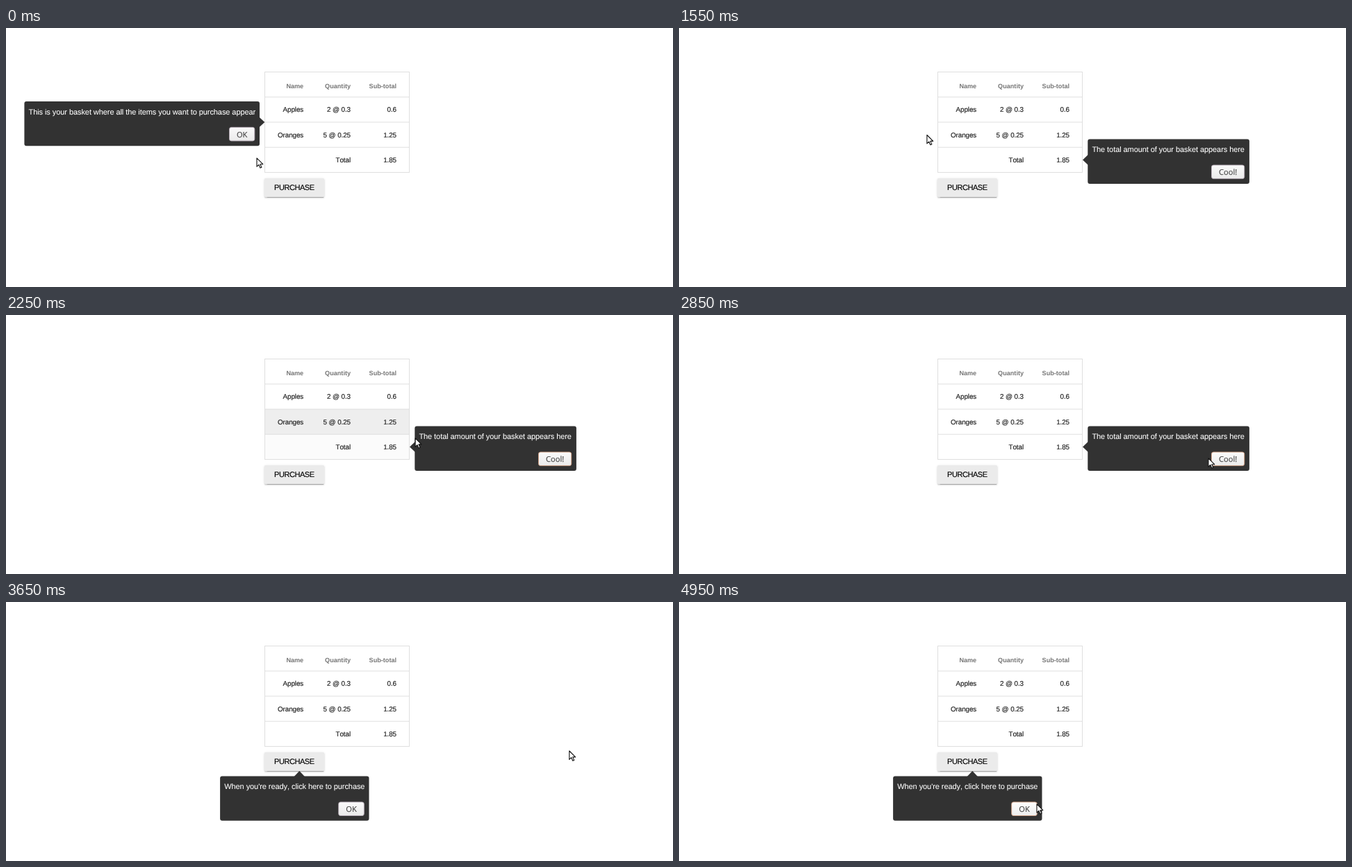
An HTML page that plays this animation: 960 by 374 pixels, repeating every 5 s.

```html
<!DOCTYPE html>
<html lang="en">
<head>
<meta charset="utf-8">
<title>Basket tour</title>
<style>
html, body { margin: 0; width: 100%; height: 100%; overflow: hidden; background: #fff; }
svg { position: absolute; left: 0; top: 0; display: block; }
text { font-family: "Liberation Sans", Arial, sans-serif; font-kerning: none; text-rendering: geometricPrecision; stroke-width: .15px; }
.head { font-size: 9.1px; font-weight: bold; fill: #757575; text-anchor: end; }
.cell { font-size: 9.9px; letter-spacing: -.1px; fill: #1c1c1c; stroke: #1c1c1c; text-anchor: end; }
.tip { font-size: 11px; letter-spacing: -.07px; fill: #fff; stroke: #fff; stroke-width: .08px; }
.label { font: 11.1px "Open Sans", "Noto Sans", sans-serif; fill: #444; stroke: #444; text-anchor: middle; }
.buy { font-size: 11px; letter-spacing: -.45px; fill: #000; stroke: #000; text-anchor: middle; }
#buy {
  position: absolute; left: 372.4px; top: 216.6px; width: 85.4px; height: 27.3px;
  border-radius: 1.5px; background: #ebebeb;
  box-shadow: 0 1.5px 1.5px rgba(0,0,0,.14), 0 2.3px .8px -1.5px rgba(0,0,0,.2), 0 .8px 3.8px rgba(0,0,0,.12);
}
</style>
</head>
<body>
<div id="buy"></div>
<svg id="stage" width="960" height="374" viewBox="0 0 960 374">
  <defs>
    <linearGradient id="normal" x2="0" y2="1"><stop stop-color="#fafafa"/><stop offset="1" stop-color="#ebebeb"/></linearGradient>
    <linearGradient id="hover" x2="0" y2="1"><stop stop-color="#fdfdfd"/><stop offset="1" stop-color="#eeeeee"/></linearGradient>
    <linearGradient id="press" x2="0" y2="1"><stop stop-color="#dedede"/><stop offset="1" stop-color="#e8e8e8"/></linearGradient>
  </defs>
</svg>
<script>
const LOOP = 5000, STEP = 50;
const stage = document.getElementById('stage');

function add(tag, attrs, parent = stage, content = '') {
  const el = document.createElementNS('http://www.w3.org/2000/svg', tag);
  for (const name in attrs) el.setAttribute(name, attrs[name]);
  el.textContent = content;
  return parent.appendChild(el);
}
const write = (cls, x, y, content, parent) => add('text', { class: cls, x, y }, parent, content);

// Basket table
const table = { left: 372.5, top: 63.5, right: 580.5, row: 36.25 };
const columns = [428.2, 496, 562];
const rows = [
  ['Apples', '2 @ 0.3', '0.6'],
  ['Oranges', '5 @ 0.25', '1.25'],
  ['', 'Total', '1.85']
];
const rowTop = i => table.top + (i + 1) * table.row;
const width = table.right - table.left;
const shades = rows.map((_, i) =>
  add('rect', { x: table.left, y: rowTop(i), width, height: table.row, fill: '#eee' }));
add('rect', { x: table.left, y: table.top, width, height: 4 * table.row, fill: 'none', stroke: '#dfdfdf' });
rows.forEach((row, r) => {
  add('path', { d: `M${table.left} ${rowTop(r)}h${width}`, stroke: '#dfdfdf' });
  row.forEach((cell, c) => write('cell', columns[c], rowTop(r) + 21.6, cell));
});
['Name', 'Quantity', 'Sub-total'].forEach((name, i) => write('head', columns[i], 87.2, name));
write('buy', 414.8, 234, 'PURCHASE');

// Tour tips; the arrow is a triangle at (ax, ay) turned by an angle
function makeTip({ x, y, w, ax, ay, turn, message, label, bw, ...times }) {
  const group = add('g', {});
  add('rect', { x, y, width: w, height: 64.3, rx: 3, fill: '#323232' }, group);
  add('path', { d: 'M0 0L7.6 8H-7.6Z', fill: '#323232', transform: `translate(${ax} ${ay}) rotate(${turn})` }, group);
  write('tip', x + 6.1, y + 18.7, message, group);
  const bx = x + w - 7.2 - bw, by = y + 37.4;
  const face = add('rect', { x: bx, y: by, width: bw, height: 19.6, rx: 2.8, 'stroke-width': .9 }, group);
  const text = write('label', bx + bw / 2, by + 14.3, label, group);
  const over = (px, py) => px >= bx && px <= bx + bw && py >= by && py <= by + 19.6;
  return { group, face, text, over, ...times };
}
const tips = [
  { x: 26.4, y: 106, w: 338.6, ax: 372.3, ay: 136, turn: 90, bw: 36.3, label: 'OK',
    message: 'This is your basket where all the items you want to purchase appear', start: 0, press: 1450, end: 1550 },
  { x: 588.3, y: 160.6, w: 232.6, ax: 581, ay: 190.4, turn: -90, bw: 47.2, label: 'Cool!',
    message: 'The total amount of your basket appears here', start: 1550, press: 3600, end: 3650 },
  { x: 308.1, y: 251.5, w: 214.4, ax: 422.3, ay: 244, turn: 0, bw: 36.6, label: 'OK',
    message: "When you're ready, click here to purchase", start: 3650, press: LOOP, end: LOOP }
].map(makeTip);

const pointer = add('path', {
  d: 'M.4 .5V12.9L3.3 10.2L5.3 14.8L7.3 13.9L5.3 9.4H9.2Z',
  fill: '#fff', stroke: '#111', 'stroke-width': 1.1, 'stroke-linejoin': 'round'
});

// Pointer moves: each glides to (x, y), sagging by bow on the way
const home = { x: 360.6, y: 187.3 };
const moves = [
  { from: 0, to: 300, x: 376, y: 131, bow: 0 },
  { from: 300, to: 650, x: 356.5, y: 154, bow: 0 },
  { from: 1950, to: 2450, x: 643.5, y: 186.5, bow: -5 },
  { from: 2550, to: 3150, x: 810.4, y: 214.5, bow: 0 },
  { from: 4050, to: 4600, x: 578.5, y: 271.5, bow: 11 },
  { from: 4600, to: 4950, x: 514.6, y: 291.3, bow: 0 }
];
function pointerAt(t) {
  let { x, y } = home;
  for (const m of moves) {
    if (t <= m.from) break;
    const k = Math.sin(Math.min(1, (t - m.from) / (m.to - m.from)) * Math.PI / 2);
    x += (m.x - x) * k;
    y += (m.y - y) * k + m.bow * Math.sin(Math.PI * k);
  }
  return { x, y };
}

// A row's shade follows how much of the last moments the pointer spent on it
function shadeAt(i, t, span = 280, dt = 10) {
  let hits = 0;
  for (let s = Math.max(0, t - span); s < t; s += dt) {
    const { x, y } = pointerAt(s);
    if (x > table.left && x < table.right && y > rowTop(i) && y < rowTop(i + 1)) hits++;
  }
  return Math.sin(hits * dt / span * Math.PI / 2);
}

function draw(t) {
  const { x, y } = pointerAt(t);
  pointer.setAttribute('transform', `translate(${x} ${y})`);
  shades.forEach((shade, i) => shade.setAttribute('opacity', shadeAt(i, t)));
  for (const { group, face, text, over, start, press, end } of tips) {
    const pressed = t >= press;
    const focused = start > 0 && t >= start + STEP;
    group.style.display = t >= start && t < end ? '' : 'none';
    face.setAttribute('fill', `url(#${pressed ? 'press' : over(x, y) ? 'hover' : 'normal'})`);
    face.setAttribute('stroke', pressed ? '#b9714c' : focused ? '#d9a487' : '#b8adb8');
    text.setAttribute('transform', pressed ? 'translate(.8 .4)' : '');
  }
}

const begin = performance.now();
function tick() {
  const t = (performance.now() - begin) % LOOP;
  draw(Math.floor(t / STEP) * STEP);
  requestAnimationFrame(tick);
}
tick();
</script>
</body>
</html>
```
